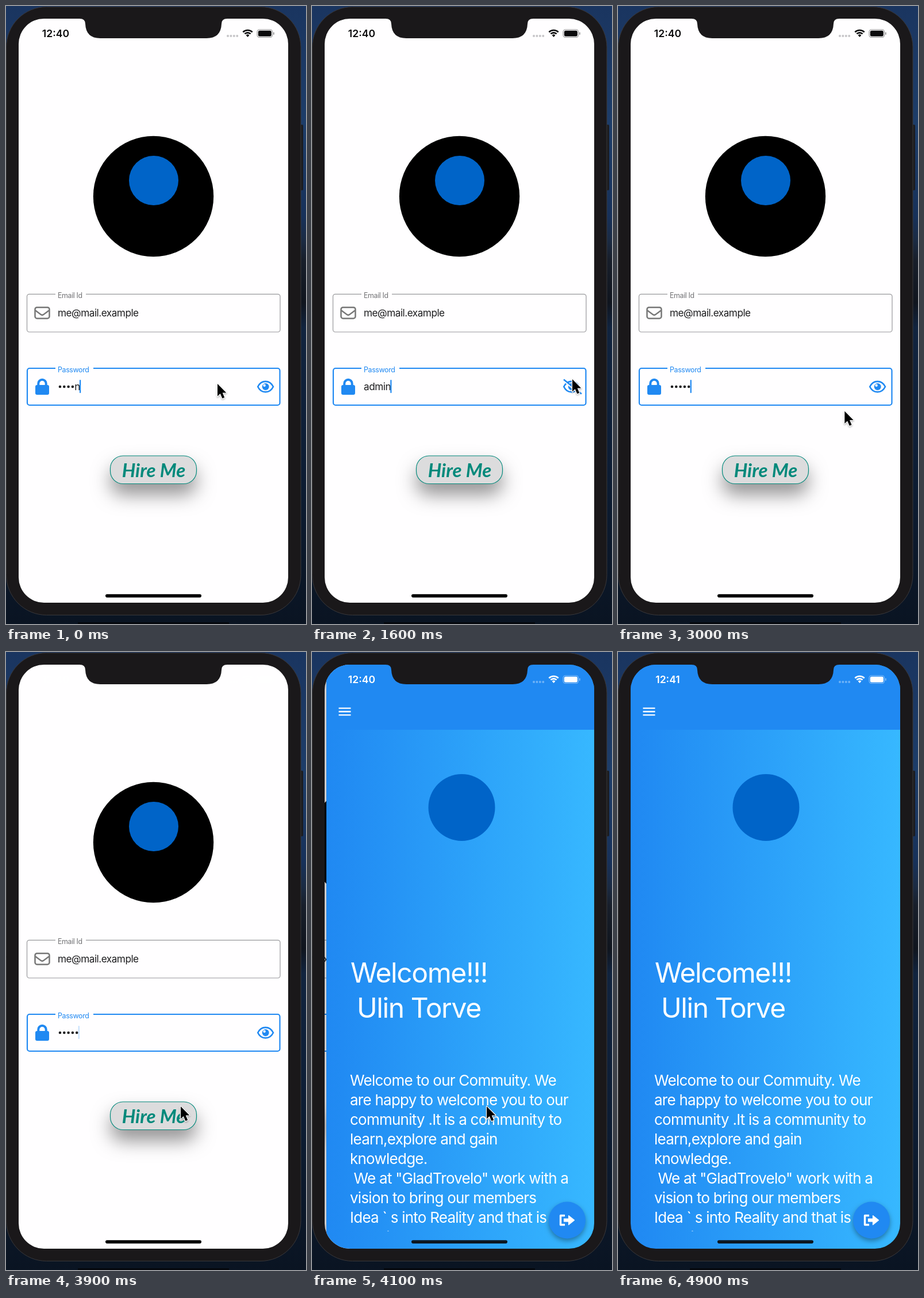
Recreate the animation shown at these times as an HTML page with a canvas. Size 522 by 1073 pixels, loop 5000 ms.

```html
<!DOCTYPE html>
<html lang="en">
<head>
<meta charset="utf-8">
<title>Login flow</title>
<style>
  html, body { margin: 0; width: 100%; height: 100%; overflow: hidden; background: #0b1626; }
  canvas { display: block; width: 522px; height: 1073px; }
</style>
</head>
<body>
<canvas id="stage"></canvas>
<script>
const W = 522, H = 1073, LOOP = 5000, STEP = 100;
const SCREEN = { x: 22, y: 22, w: 469, h: 1014, r: 44 };
const BLUE = '#2089f2', TEAL = '#00897b', LOGO = '#0064c8', PAPER = '#fffeff', INK = '#1d1d1f';
const SANS = 'Inter, Roboto, sans-serif';

const canvas = document.getElementById('stage');
const ctx = canvas.getContext('2d');
const dpr = window.devicePixelRatio || 1;
canvas.width = W * dpr;
canvas.height = H * dpr;

function rounded(x, y, w, h, r) {
  ctx.beginPath();
  ctx.roundRect(x, y, w, h, r);
}

function box(x, y, w, h, r, color) {
  rounded(x, y, w, h, r);
  ctx.fillStyle = color;
  ctx.fill();
}

function disc(x, y, r, color) {
  ctx.beginPath();
  ctx.arc(x, y, r, 0, Math.PI * 2);
  ctx.fillStyle = color;
  ctx.fill();
}

function line(points, color, width) {
  ctx.beginPath();
  points.forEach(([x, y]) => ctx.lineTo(x, y));
  ctx.strokeStyle = color;
  ctx.lineWidth = width;
  ctx.stroke();
}

function text(str, x, y, size, color, weight = 400, align = 'left') {
  ctx.font = `${weight} ${size}px ${SANS}`;
  ctx.letterSpacing = `${weight > 400 ? 0 : -0.029 * size}px`;
  ctx.textAlign = align;
  ctx.fillStyle = color;
  ctx.fillText(str, x, y);
}

function gradient(x0, y0, x1, y1, stops) {
  const g = ctx.createLinearGradient(x0, y0, x1, y1);
  stops.forEach(([at, color]) => g.addColorStop(at, color));
  return g;
}

function shadow(color, blur, dy) {
  ctx.shadowColor = color;
  ctx.shadowBlur = blur * dpr;
  ctx.shadowOffsetY = dy * dpr;
}

function layer(draw) {
  ctx.save();
  draw();
  ctx.restore();
}

// Desktop and phone

function desktop() {
  ctx.fillStyle = gradient(0, 0, 0, H, [
    [0, '#1a3560'], [0.19, '#1d3d69'], [0.34, '#17315a'], [0.38, '#1b2b43'],
    [0.41, '#181f2b'], [0.48, '#10151e'], [0.52, '#11243f'], [0.75, '#0d1d34'], [1, '#0a1422']
  ]);
  ctx.fillRect(0, 0, W, H);
  box(125, 1070, 263, 3, 0, '#05080d');
}

function phone() {
  box(509, 206, 8, 114, 2, '#1c1c1f');
  box(0.5, 1.5, 512.5, 1056, 70, '#1a181a');
  ctx.strokeStyle = '#39383b';
  ctx.lineWidth = 1;
  ctx.stroke();
}

function notch() {
  ctx.beginPath();
  ctx.moveTo(128, 20);
  ctx.lineTo(128, 22);
  ctx.quadraticCurveTo(138, 22, 138, 31);
  ctx.quadraticCurveTo(139, 56, 164, 56);
  ctx.lineTo(349, 56);
  ctx.quadraticCurveTo(374, 56, 375, 31);
  ctx.quadraticCurveTo(375, 22, 385, 22);
  ctx.lineTo(385, 20);
  ctx.fillStyle = '#1a181a';
  ctx.fill();
}

function statusBar(clock, light) {
  const ink = light ? '#fff' : '#0b0b0c';
  text(clock, 86.5, 54, 17.6, ink, 600, 'center');
  for (let i = 0; i < 4; i++) {
    disc(386 + i * 5.4, 52, 2, light ? 'rgba(255,255,255,.35)' : '#c6c5c8');
  }
  ctx.strokeStyle = ink;
  ctx.lineWidth = 2.7;
  for (const r of [11.5, 7.2]) {
    ctx.beginPath();
    ctx.arc(420.5, 53.5, r, Math.PI * 1.25, Math.PI * 1.75);
    ctx.stroke();
  }
  ctx.beginPath();
  ctx.moveTo(420.5, 54);
  ctx.arc(420.5, 53.5, 4, Math.PI * 1.25, Math.PI * 1.75);
  ctx.fillStyle = ink;
  ctx.fill();
  layer(() => {
    ctx.globalAlpha = 0.45;
    rounded(437, 41, 26.5, 13.5, 4);
    ctx.lineWidth = 1.1;
    ctx.stroke();
    box(465, 45.5, 1.6, 4.5, 1, ink);
  });
  box(438.8, 42.8, 23, 10, 2.4, ink);
}

// Login page

function field(x, y, w, h, label, gapEnd, color, ink, width) {
  rounded(x, y, w, h, 4);
  ctx.strokeStyle = color;
  ctx.lineWidth = width;
  ctx.stroke();
  box(86, y - 2, gapEnd - 86, 4, 0, PAPER);
  text(label, 90, y + 6.5, 12.4, ink);
}

function envelope() {
  rounded(50.5, 523.2, 25, 19.3, 3.5);
  ctx.strokeStyle = '#777';
  ctx.lineWidth = 2.5;
  ctx.stroke();
  line([[51, 528.5], [61, 536], [63, 536.7], [65, 536], [75, 528.5]], '#777', 2.4);
}

function lock() {
  box(51, 658, 24, 17, 3, BLUE);
  ctx.beginPath();
  ctx.moveTo(56.3, 660);
  ctx.lineTo(56.3, 655.5);
  ctx.arc(63, 655.5, 6.7, Math.PI, 0);
  ctx.lineTo(69.7, 660);
  ctx.strokeStyle = BLUE;
  ctx.lineWidth = 4;
  ctx.stroke();
}

function eye(slashed) {
  ctx.beginPath();
  ctx.moveTo(438.2, 661);
  ctx.bezierCurveTo(444, 648.8, 459, 648.8, 465, 661);
  ctx.bezierCurveTo(459, 673.2, 444, 673.2, 438.2, 661);
  ctx.closePath();
  ctx.strokeStyle = BLUE;
  ctx.lineWidth = 2.6;
  ctx.stroke();
  disc(451.7, 661, 6, BLUE);
  disc(449.6, 658.8, 2.2, PAPER);
  if (slashed) {
    line([[439, 651], [467, 675]], PAPER, 3);
    line([[438, 648.5], [469, 673.5]], BLUE, 2.6);
  }
}

// Masked characters become dots; the rest follows as plain text.
function password({ masked, plain, caret, caretX }) {
  const pitch = 7.3;
  for (let i = 0; i < masked; i++) disc(94 + i * pitch, 661, 2.3, INK);
  text(plain, 90 + masked * pitch, 666.5, 17.2, INK);
  layer(() => {
    ctx.globalAlpha = caret;
    box(caretX, 649, 2.2, 23, 1, BLUE);
  });
}

function hireButton() {
  layer(() => {
    shadow('rgba(0,0,0,.42)', 32, 19);
    box(181.5, 781, 150, 48.5, 22, '#dcdcdd');
  });
  rounded(181.5, 781, 150, 48.5, 22);
  ctx.strokeStyle = TEAL;
  ctx.lineWidth = 1.2;
  ctx.stroke();
  ctx.font = 'italic 700 33px Pacifico, Lato, cursive';
  ctx.letterSpacing = '0px';
  ctx.textAlign = 'center';
  ctx.fillStyle = TEAL;
  ctx.fillText('Hire Me', 257, 817.5);
}

function loginPage(state) {
  ctx.fillStyle = PAPER;
  ctx.fillRect(SCREEN.x, SCREEN.y, SCREEN.w, SCREEN.h);
  disc(256.5, 330.5, 104.7, '#000');
  disc(257, 303, 43, LOGO);

  field(36.5, 500.3, 440.5, 65.7, 'Email Id', 139, '#98989b', '#727275', 1.2);
  envelope();
  text('me@mail.example', 90, 539, 17.2, INK);

  field(37, 629, 439.5, 64, 'Password', 152, BLUE, BLUE, 2.2);
  lock();
  password(state);
  eye(state.revealed);
  hireButton();
}

// Welcome page

const COPY = [
  'Welcome to our Commuity. We',
  'are happy to welcome you to our',
  'community .It is a community to',
  'learn,explore and gain',
  'knowledge.',
  ' We at "GladTrovelo" work with a',
  'vision to bring our members',
  'Idea ` s into Reality and that is',
  'what it takes.'
];

function exitButton() {
  layer(() => {
    shadow('rgba(0,0,0,.35)', 9, 4);
    disc(441, 986.5, 32, BLUE);
  });
  ctx.lineJoin = 'round';
  line([[437, 978.5], [429.5, 978.5], [429.5, 994.5], [437, 994.5]], '#fff', 3.4);
  ctx.beginPath();
  [[435.5, 984], [443.5, 984], [443.5, 978.5], [453.5, 986.5], [443.5, 994.5], [443.5, 989], [435.5, 989]]
    .forEach(([x, y]) => ctx.lineTo(x, y));
  ctx.closePath();
  ctx.fillStyle = '#fff';
  ctx.fill();
  ctx.lineWidth = 1.2;
  ctx.stroke();
}

function welcomePage() {
  const { x, y, w, h } = SCREEN;
  const edge = w * 0.05;
  ctx.fillStyle = gradient(x - edge, 0, x, 0, [
    [0, 'rgba(0,0,0,0)'], [0.3, 'rgba(0,0,0,.016)'], [0.6, 'rgba(0,0,0,.07)'], [1, 'rgba(0,0,0,.22)']
  ]);
  ctx.fillRect(x - edge, y, edge, h);
  ctx.fillStyle = gradient(x, 0, x + w, 0, [[0, '#2089f2'], [0.06, '#218bf3'], [1, '#37b8ff']]);
  ctx.fillRect(x, y, w, h);
  ctx.fillStyle = BLUE;
  ctx.fillRect(x, y, w, 113);
  for (const row of [97.7, 103.5, 109.3]) box(43.5, row - 1.15, 21, 2.3, 0, '#fff');

  disc(257.5, 270, 58, LOGO);
  text('Welcome!!!', 64, 574, 48, '#fff');
  text('Ulin Torve', 75, 635, 48, '#fff');
  layer(() => {
    ctx.beginPath();
    ctx.rect(x, 700, w, 305.5);
    ctx.clip();
    COPY.forEach((row, i) => text(row, 63, 752.5 + i * 34, 26, '#fff'));
  });
  exitButton();
}

// Motion

const MOVES = [
  { from: 100, to: 700, x: 453, y: 648 },
  { from: 2700, to: 3400, x: 304, y: 789 },
  { from: 4400, to: 4700, x: 545, y: 900 }
];

function pointerAt(t) {
  let p = { x: 368, y: 656 };
  for (const m of MOVES) {
    const u = Math.min(1, Math.max(0, (t - m.from) / (m.to - m.from)));
    const e = u * u * (3 - 2 * u);
    p = { x: p.x + (m.x - p.x) * e, y: p.y + (m.y - p.y) * e };
  }
  return p;
}

function pointer({ x, y }) {
  layer(() => {
    ctx.translate(x, y);
    ctx.beginPath();
    [[0, 0], [0, 21.5], [4.8, 17], [8.4, 25.3], [12.2, 23.7], [8.7, 15.6], [15.3, 15.4]]
      .forEach(([px, py]) => ctx.lineTo(px, py));
    ctx.closePath();
    ctx.lineJoin = 'round';
    layer(() => {
      shadow('rgba(0,0,0,.3)', 3, 1.5);
      ctx.strokeStyle = '#fff';
      ctx.lineWidth = 2.4;
      ctx.stroke();
    });
    ctx.fillStyle = '#000';
    ctx.fill();
  });
}

// Distance of the incoming page from its resting place.
function slideAt(t) {
  if (t < 4000) return SCREEN.w;
  if (t < 4100) return 84;
  return t < 4200 ? 3 : 0;
}

function formAt(t) {
  const phase = t % 500;
  const caret = phase < 300 ? 1 : phase < 400 ? 0.6 : 0.25;
  if (t < 1500) return { masked: 4, plain: 'n', caretX: 128, caret, revealed: false };
  if (t < 2500) return { masked: 0, plain: 'admin', caretX: 136.3, caret, revealed: true };
  return { masked: 5, plain: '', caretX: 125.7, caret, revealed: false };
}

function render(t) {
  ctx.setTransform(dpr, 0, 0, dpr, 0, 0);
  desktop();
  phone();
  const slide = slideAt(t);
  layer(() => {
    rounded(SCREEN.x, SCREEN.y, SCREEN.w, SCREEN.h, SCREEN.r);
    ctx.clip();
    if (slide > 0) {
      layer(() => {
        ctx.translate((slide - SCREEN.w) / 3, 0);
        loginPage(formAt(t));
      });
    }
    if (slide < SCREEN.w) {
      layer(() => {
        ctx.translate(slide, 0);
        welcomePage();
      });
    }
    statusBar(t < 4600 ? '12:40' : '12:41', t >= 3900);
    box(173, 1021.3, 167, 5.6, 2.8, slide < SCREEN.w ? '#0c1620' : '#000');
  });
  notch();
  pointer(pointerAt(t));
}

const start = performance.now();
function tick() {
  const t = (performance.now() - start) % LOOP;
  render(Math.floor(t / STEP) * STEP);
  requestAnimationFrame(tick);
}
tick();
</script>
</body>
</html>
```
